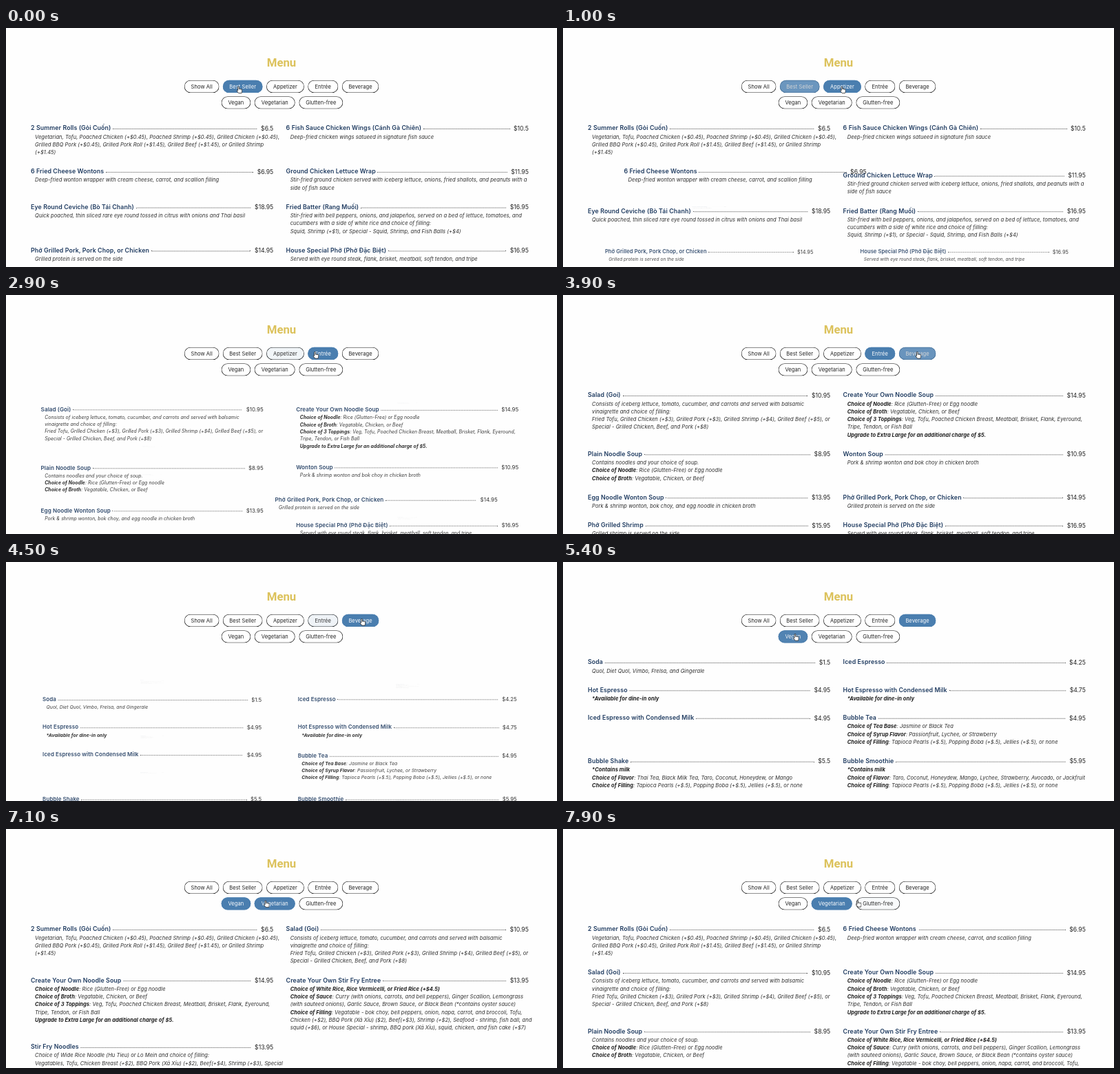
An HTML page for the animation above (8 s loop, 800 px wide and 347 px high).

```html
<!DOCTYPE html>
<html lang="en">
<head>
<meta charset="utf-8">
<title>Menu</title>
<style>
html, body { margin: 0; width: 800px; height: 347px; overflow: hidden; background: #fefefe; }
body { position: relative; font-family: Inter, sans-serif; font-variant-ligatures: no-contextual; }
h1 { position: absolute; left: 0; top: 38px; width: 800px; margin: 0; text-align: center;
  font: 700 16.8px/24px Roboto, sans-serif; color: #dcc25c; }
/* Items and buttons are laid out at full page size and scaled down. */
.btn, .item { position: absolute; left: 0; top: 0; transform-origin: 0 0; white-space: nowrap; }
.btn { height: 39px; border-radius: 20px; text-align: center; font-size: 16px; line-height: 39px; letter-spacing: .01em; }
.item { width: 750px; box-sizing: border-box; padding-top: 2px; }
.head { display: flex; height: 28px; line-height: 28px; font-size: 18.8px; }
.head b { font-weight: 600; letter-spacing: .01em; color: #1f3b60; }
.head i { flex: 1; margin: 0 12px 0 6px; height: 15px; border-bottom: 2px dotted #444; }
.head span { color: #222; font-size: 18.4px; }
.desc { padding-left: 13px; font-size: 16px; line-height: 24px; letter-spacing: .008em; font-style: italic; color: #2b2b2b; }
.desc b { font-weight: 700; color: #1c1c1c; }
#hand { position: absolute; left: -4.5px; top: -1.4px; width: 9.3px; height: 11px; }
</style>
</head>
<body>
<h1>Menu</h1>
<div id="list"></div>
<div id="bar"></div>
<svg id="hand" viewBox="0 0 16 19"><path d="M4.5 11V2.2a1.5 1.5 0 0 1 3 0V7.5a1.4 1.4 0 0 1 2.7.3a1.3 1.3 0 0 1 2.5.5a1.2 1.2 0 0 1 2.3.8V12.5q0 2.5-1.2 5H6.5L2 12a1.4 1.4 0 0 1 2.5-1z" fill="#fff" stroke="#111" stroke-width="1.3" stroke-linejoin="round"/></svg>
<script>
const LOOP = 8000, FADE = 400, STEP = 10, ZOOM = .4696;
const ITEM_W = 750 * ZOOM, BTN_H = 39 * ZOOM;

// title, price, tags, lines; a leading "!" makes a line bold
const toppings = ['Choice of Noodle: Rice (Glutten-Free) or Egg noodle', 'Choice of Broth: Vegatable, Chicken, or Beef'];
const boba = 'Choice of Filling: Tapioca Pearls (+$.5), Popping Boba (+$.5), Jellies (+$.5), or none';
const dineIn = '!*Available for dine-in only';
const menu = [
  ['2 Summer Rolls (Gỏi Cuốn)', 6.5, 'abgt',
    'Vegetarian, Tofu, Poached Chicken (+$0.45), Poached Shrimp (+$0.45), Grilled Chicken (+$0.45),',
    'Grilled BBQ Pork (+$0.45), Grilled Pork Roll (+$1.45), Grilled Beef (+$1.45), or Grilled Shrimp', '(+$1.45)'],
  ['6 Fish Sauce Chicken Wings (Cánh Gà Chiên)', 10.5, 'ab', 'Deep-fried chicken wings satueed in signature fish sauce'],
  ['2 Spring Rolls (Chả Giò)', 6.5, 'a', 'Ground pork, taro, carrot, mushroom, glass noodle, and onion'],
  ['6 Fried Cheese Wontons', 6.95, 'abt', 'Deep-fried wonton wrapper with cream cheese, carrot, and scallion filling'],
  ['6 Fried or Steamed Filled Dumplings', 6.95, 'a', 'Contains pork, onion, napa, bok choy, and sesame oil'],
  ['Ground Chicken Lettuce Wrap', 11.95, 'ab',
    'Stir-fried ground chicken served with iceberg lettuce, onions, fried shallots, and peanuts with a', 'side of fish sauce'],
  ['Eye Round Ceviche (Bò Tái Chanh)', 18.95, 'ab', 'Quick poached, thin sliced rare eye round tossed in citrus with onions and Thai basil'],
  ['Fried Batter (Rang Muối)', 16.95, 'ab',
    'Stir-fried with bell peppers, onions, and jalapeños, served on a bed of lettuce, tomatoes, and',
    'cucumbers with a side of white rice and choice of filling:',
    'Squid, Shrimp (+$1), or Special - Squid, Shrimp, and Fish Balls (+$4)'],
  ['Salad (Goi)', 10.95, 'egt',
    'Consists of iceberg lettuce, tomato, cucumber, and carrots and served with balsamic',
    'vinaigrette and choice of filling:',
    'Fried Tofu, Grilled Chicken (+$3), Grilled Pork (+$3), Grilled Shrimp (+$4), Grilled Beef (+$5), or',
    'Special - Grilled Chicken, Beef, and Pork (+$8)'],
  ['Create Your Own Noodle Soup', 14.95, 'egt', ...toppings,
    'Choice of 3 Toppings: Veg, Tofu, Poached Chicken Breast, Meatball, Brisket, Flank, Eyeround,',
    'Tripe, Tendon, or Fish Ball', '!Upgrade to Extra Large for an additional charge of $5.'],
  ['Plain Noodle Soup', 8.95, 'et', 'Contains noodles and your choice of soup.', ...toppings],
  ['Wonton Soup', 10.95, 'e', 'Pork & shrimp wonton and bok choy in chicken broth'],
  ['Egg Noodle Wonton Soup', 13.95, 'e', 'Pork & shrimp wonton, bok choy, and egg noodle in chicken broth'],
  ['Phở Grilled Pork, Pork Chop, or Chicken', 14.95, 'be', 'Grilled protein is served on the side'],
  ['Phở Grilled Shrimp', 15.95, 'e', 'Grilled shrimp is served on the side'],
  ['House Special Phở (Phở Đặc Biệt)', 16.95, 'be', 'Served with eye round steak, flank, brisket, meatball, soft tendon, and tripe'],
  ['Create Your Own Stir Fry Entree', 13.95, 'egt',
    '!Choice of White Rice, Rice Vermicelli, or Fried Rice (+$4.5)',
    'Choice of Sauce: Curry (with onions, carrots, and bell peppers), Ginger Scallion, Lemongrass',
    '(with sauteed onions), Garlic Sauce, Brown Sauce, or Black Bean (*contains oyster sauce)',
    'Choice of Filling: Vegatable - bok choy, bell peppers, onion, napa, carrot, and broccoli, Tofu,',
    'Chicken (+$2), BBQ Pork (Xá Xíu) ($2), Beef(+$3), Shrimp (+$2), Seafood - shrimp, fish ball, and',
    'squid (+$6), or House Special - shrimp, BBQ pork (Xá Xíu), squid, chicken, and fish cake (+$7)'],
  ['Stir Fry Noodles', 13.95, 'egt',
    'Choice of Wide Rice Noodle (Hu Tieu) or Lo Mein and choice of filling:',
    'Vegatables, Tofu, Chicken Breast (+$2), BBQ Pork (Xá Xíu) (+$2), Beef(+$4), Shrimp (+$3), Special', '(+$6)'],
  ['Soda', 1.5, 'v', 'Quol, Diet Quol, Vimbo, Frelsa, and Gingerale'],
  ['Iced Espresso', 4.25, 'v'],
  ['Hot Espresso', 4.95, 'v', dineIn],
  ['Hot Espresso with Condensed Milk', 4.75, 'v', dineIn],
  ['Iced Espresso with Condensed Milk', 4.95, 'v'],
  ['Bubble Tea', 4.95, 'v', 'Choice of Tea Base: Jasmine or Black Tea',
    'Choice of Syrup Flavor: Passionfruit, Lychee, or Strawberry', boba],
  ['Bubble Shake', 5.5, 'v', '!*Contains milk',
    'Choice of Flavor: Thai Tea, Black Milk Tea, Taro, Coconut, Honeydew, or Mango', boba],
  ['Bubble Smoothie', 5.95, 'v', '!*Contains milk',
    'Choice of Flavor: Taro, Coconut, Honeydew, Mango, Lychee, Strawberry, Avocado, or Jackfruit', boba],
];

// label, tag, left, top, width
const buttons = [
  ['Show All', '*', 258.8, 75.8, 50.8], ['Best Seller', 'b', 314.8, 75.8, 57.8], ['Appetizer', 'a', 378, 75.8, 55],
  ['Entrée', 'e', 438.2, 75.8, 44], ['Beverage', 'v', 487.8, 75.8, 53.4],
  ['Vegan', 'g', 312.6, 99.2, 42.6], ['Vegetarian', 't', 360.6, 99.2, 59.4], ['Glutten-free', 'f', 425.4, 99.2, 63.8],
];
const clicks = [[0, 'b'], [950, 'a'], [2640, 'e'], [4250, 'v'], [5550, 'g'], [7200, 't']];
// start, end, x, y
const moves = [
  [0, 0, 338, 85.5], [300, 880, 405.5, 85.5], [2100, 2550, 449, 83], [3300, 4050, 517, 83],
  [4750, 5250, 337.5, 105], [6500, 6950, 377.5, 104.5], [7500, 8100, 437, 104],
];

const clamp = v => Math.max(0, Math.min(1, v));
const mix = (a, b, p) => a + (b - a) * p;
const glide = v => v < .5 ? 4 * v ** 3 : 1 - 4 * (1 - v) ** 3;

// cubic-bezier(.25, .1, .25, 1)
function ease(x) {
  let lo = 0, hi = 1, u = .5;
  for (let i = 0; i < 20; i++) {
    u = (lo + hi) / 2;
    if (.75 * u * (1 - u) + u ** 3 < x) lo = u; else hi = u;
  }
  return .3 * u * (1 - u) ** 2 + 3 * u * u * (1 - u) + u ** 3;
}

function add(parent, cls, html) {
  const el = document.createElement('div');
  el.className = cls;
  el.innerHTML = html;
  return parent.appendChild(el);
}

function place(el, x, y, s) {
  el.style.transform = `translate(${x}px,${y}px) scale(${s})`;
}

function lineHtml(s) {
  s = s.replace('&', '&amp;');
  return s[0] === '!' ? `<b>${s.slice(1)}</b>` : s.replace(/^(Choice of [^:]+)(?=: )/, '<b>$1</b>');
}

const list = document.getElementById('list'), bar = document.getElementById('bar'), hand = document.getElementById('hand');
const items = menu.map(([title, price, tags, ...lines]) => {
  const el = add(list, 'item', `<div class="head"><b>${title}</b><i></i><span>$${price}</span></div>` +
    `<div class="desc">${lines.map(lineHtml).join('<br>')}</div>`);
  return { el, tags, h: (62 + 24 * lines.length) * ZOOM };
});
const pills = buttons.map(([label, tag, x, y, w]) => {
  const el = add(bar, 'btn', label);
  el.style.width = w / ZOOM + 'px';
  place(el, x, y, ZOOM);
  return el;
});

// Rows of two; filtered-out items shrink where they stand.
function layout(tag, prev) {
  let y = 138, row = 0, n = 0;
  return items.map((it, i) => {
    if (tag !== '*' && !it.tags.includes(tag)) return { ...prev[i], s: 0 };
    if (n % 2 === 0) { y += row; row = 0; }
    row = Math.max(row, it.h);
    return { x: n++ % 2 ? 406.6 : 36, y, s: 1 };
  });
}
const states = [layout('*')];
clicks.forEach(([, tag], i) => states.push(layout(tag, states[i])));

const phase = t => clicks.findLastIndex(c => c[0] <= t);

function pointer(t) {
  let [, , x, y] = moves[0];
  for (const [a, b, mx, my] of moves.slice(1)) {
    if (t < a) break;
    const p = glide(clamp((t - a) / (b - a)));
    x = mix(x, mx, p);
    y = mix(y, my, p);
  }
  return [x, y];
}

function lit([, tag, x, y, w], t) {
  const [px, py] = pointer(t);
  return clicks[phase(t)][1] === tag || (px > x && px < x + w && py > y && py < y + BTN_H);
}

// Fade level of every button, sampled once over the loop.
const levels = buttons.map(b => {
  let v = +lit(b, 0);
  return Array.from({ length: LOOP / STEP }, (_, i) => {
    const on = lit(b, i * STEP);
    v = clamp(v + (on ? STEP : -STEP) / FADE);
    return on ? ease(v) : 1 - ease(1 - v);
  });
});

const blend = (a, b, p) => `rgb(${a.map((v, i) => Math.round(mix(v, b[i], p)))})`;
const WHITE = [254, 254, 254], BLUE = [74, 126, 175], INK = [34, 34, 34];

function draw(t) {
  const k = phase(t), from = states[k], to = states[k + 1];
  const p = k ? ease(clamp((t - clicks[k][0]) / FADE)) : 1;
  items.forEach(({ el, h }, i) => {
    const a = from[i], b = to[i], s = mix(a.s, b.s, p), inset = (1 - s) / 2;
    el.style.visibility = s < .002 ? 'hidden' : 'visible';
    el.style.opacity = s;
    place(el, mix(a.x, b.x, p) + inset * ITEM_W, mix(a.y, b.y, p) + inset * h, s * ZOOM);
  });
  pills.forEach((el, i) => {
    const v = levels[i][Math.floor(t / STEP)];
    el.style.background = blend(WHITE, BLUE, v);
    el.style.boxShadow = `inset 0 0 0 1.5px ${blend(INK, BLUE, v)}`;
    el.style.color = blend(INK, WHITE, v);
  });
  place(hand, ...pointer(t), 1);
}

const start = performance.now();
function tick() {
  draw((performance.now() - start) % LOOP);
  requestAnimationFrame(tick);
}
tick();
</script>
</body>
</html>
```
